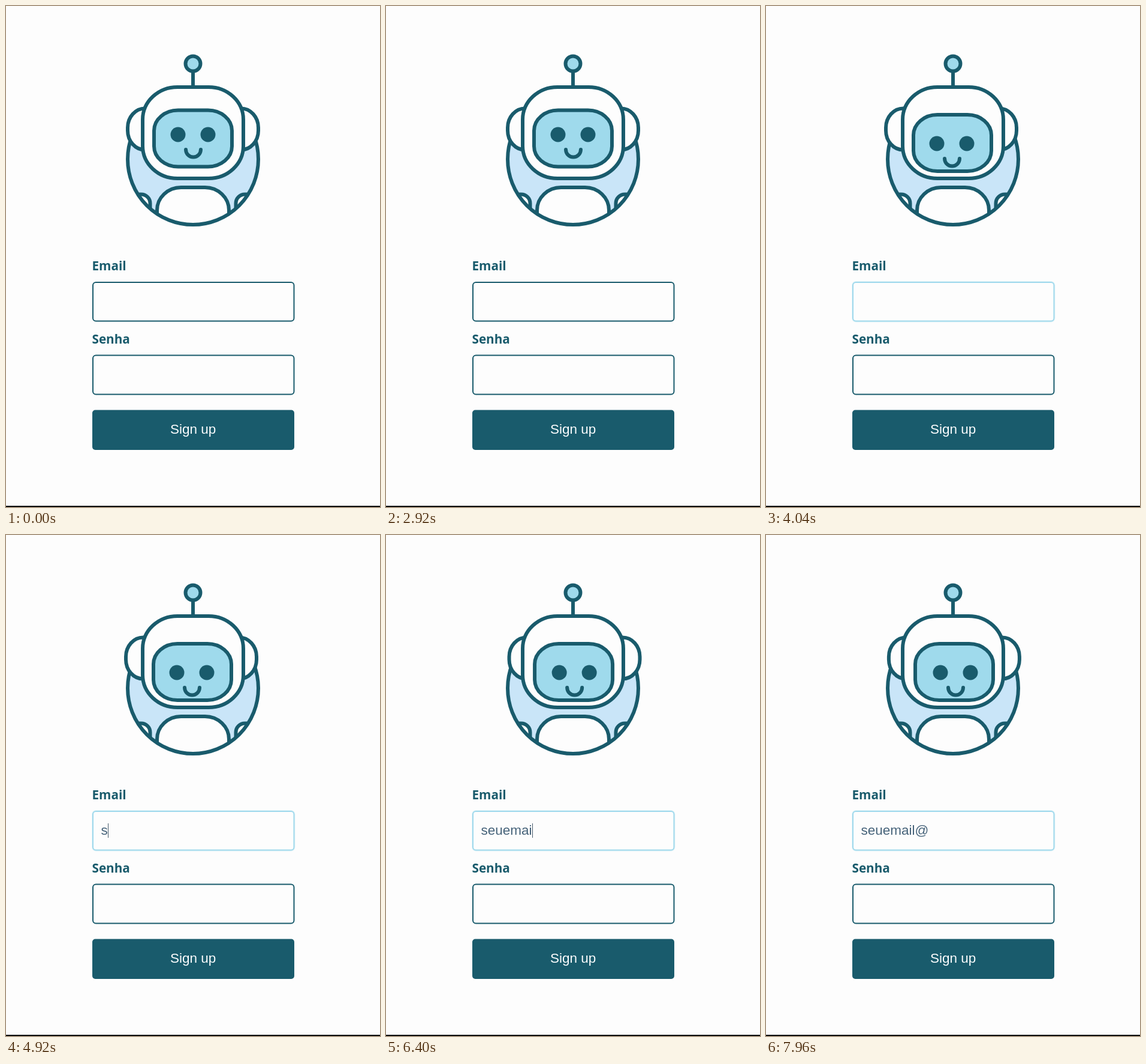
These frames come from a looping animation (624 by 834 pixels, 8 s). An HTML page with a canvas:

```html
<!DOCTYPE html>
<html lang="pt">
<head>
<meta charset="utf-8">
<title>Sign up</title>
<style>
  html, body { margin: 0; width: 100%; height: 100%; overflow: hidden; background: #fdfdfd; }
  canvas { display: block; width: 624px; height: 834px; }
</style>
</head>
<body>
<canvas id="stage" width="624" height="834"></canvas>
<script>
const ctx = document.getElementById('stage').getContext('2d');
const LOOP = 8000;
const PAPER = '#fdfdfd', DARK = '#195b6c', SKY = '#9fdaec', SUIT = '#c9e5f8';
const ARIAL = '22.5px "Liberation Sans", Arial, sans-serif';

const FOCUS = 3320;
const TEXT = 'seuemail@';
const KEYS = [4720, 5120, 5440, 5760, 5920, 6100, 6320, 6560, 7400];
const BLINKS = [20, 1785];
const BLINK_MS = 160;
// Horizontal gaze for each number of typed characters
const GAZE = [-2, -2, -0.5, 1, 1.4, 1.8, 2.1, 2.5, 3.2, 4];

const clamp = p => Math.max(0, Math.min(1, p));
const ease = p => { p = clamp(p); return p * p * (3 - 2 * p); };
const earShift = gaze => gaze < 0 ? -3 : 3.3 - 0.35 * gaze;

// Adds up eased steps, one for focus and one for each key
function follow(t, goal, ms, focusMs) {
  let last = goal(GAZE[0]);
  let value = last * ease((t - FOCUS) / focusMs);
  KEYS.forEach((at, i) => {
    const next = goal(GAZE[i + 1]);
    value += (next - last) * ease((t - at) / ms);
    last = next;
  });
  return value;
}

function eyeOpen(t) {
  for (const at of BLINKS) {
    const p = (t - at) / BLINK_MS;
    if (p > 0 && p < 1) return 1 - 0.9 * (1 - Math.abs(2 * p - 1));
  }
  return 1;
}

function paint(fill, stroke, width = 6) {
  if (fill) { ctx.fillStyle = fill; ctx.fill(); }
  if (stroke) { ctx.strokeStyle = stroke; ctx.lineWidth = width; ctx.stroke(); }
}

function box(x, y, w, h, r, fill, stroke, width) {
  ctx.beginPath();
  ctx.roundRect(x, y, w, h, r);
  paint(fill, stroke, width);
}

function disc(x, y, r, fill, stroke) {
  ctx.beginPath();
  ctx.arc(x, y, r, 0, 7);
  paint(fill, stroke);
}

function label(text, x, y, font, color, align = 'left') {
  ctx.font = font;
  ctx.fillStyle = color;
  ctx.textAlign = align;
  ctx.fillText(text, x, y);
}

function body() {
  disc(312, 255, 109, SUIT);
  ctx.save();
  ctx.beginPath();
  ctx.arc(312, 255, 109, 0, 7);
  ctx.clip();
  box(252, 302, 120, 100, { x: 40, y: 38 }, PAPER, DARK);
  box(200, 313.5, 40.5, 80, 15, PAPER, DARK);
  box(383.5, 313.5, 40.5, 80, 15, PAPER, DARK);
  ctx.restore();
  disc(312, 255, 109, null, DARK);
}

function head(t) {
  const ear = follow(t, earShift, 200, 220);
  const lookX = follow(t, g => g, 300, 400);
  const lookY = 15 * ease((t - FOCUS) / 500);

  box(203 + ear, 170.5, 60, 69, { x: 29, y: 32 }, PAPER, DARK);
  box(361 + ear, 170.5, 60, 69, { x: 29, y: 32 }, PAPER, DARK);
  ctx.beginPath();
  ctx.moveTo(312, 108);
  ctx.lineTo(312, 134);
  paint(null, DARK);
  disc(312, 96, 12.5, SKY, DARK);
  box(228, 135, 168, 152, { x: 58, y: 54 }, PAPER, DARK);
  box(247 + lookX / 2, 173.5 + lookY / 2, 130, 94, { x: 40, y: 34 }, SKY, DARK);

  const h = 25 * eyeOpen(t);
  for (const x of [287, 337]) {
    box(x - 12.5 + lookX, 214 - h / 2 + lookY, 25, h, h / 2, DARK);
  }
  ctx.beginPath();
  ctx.arc(312.5 + lookX, 239 + lookY, 12.5, 0, Math.PI);
  ctx.lineCap = 'round';
  paint(null, DARK);
  ctx.lineCap = 'butt';
}

function form(t) {
  const bold = '700 20.7px "Open Sans", "Noto Sans", sans-serif';
  const focused = t >= FOCUS;
  label('Email', 143.5, 440, bold, DARK);
  label('Senha', 143.5, 561.5, bold, DARK);
  if (focused) box(145, 460, 335.5, 64.5, 5, null, 'rgba(159,218,236,.3)', 4);
  box(145, 460, 335.5, 64.5, 5, PAPER, focused ? '#a0d9ec' : DARK, 2);
  box(145, 581.5, 335.5, 65, 5, PAPER, DARK, 2);
  box(144, 672.5, 337, 66.5, 5, DARK);
  label('Sign up', 312.2, 711.5, ARIAL, '#fafcfd', 'center');
  if (!focused) return;

  const count = KEYS.filter(at => t >= at).length;
  const typed = TEXT.slice(0, count);
  label(typed, 158.5, 499, ARIAL, '#46637a');
  const since = t - (count ? KEYS[count - 1] : FOCUS);
  if (since % 1000 < 500) {
    const x = Math.round(158.5 + ctx.measureText(typed).width);
    ctx.fillStyle = '#46596a';
    ctx.fillRect(x, 480, 1, 24);
  }
}

function pointer(t) {
  const enter = ease((t - 1200) / 320);
  const go = ease((t - 2560) / 640);
  const x = -16 + 28 * enter + 260 * go;
  const y = 538 - 40 * go;
  if (x <= -16 || (x > 144 && y < 526)) return;
  ctx.save();
  ctx.translate(x + 0.5, y + 0.5);
  ctx.beginPath();
  [[0, 0], [0, 20], [5, 16], [8, 23], [11.5, 21.5], [8.5, 14.5], [14.5, 14.5]]
    .forEach(([px, py]) => ctx.lineTo(px, py));
  ctx.closePath();
  paint(PAPER, '#666', 1);
  ctx.restore();
}

function frame() {
  const t = performance.now() % LOOP;
  ctx.fillStyle = PAPER;
  ctx.fillRect(0, 0, 624, 834);
  body();
  head(t);
  form(t);
  pointer(t);
  ctx.fillStyle = '#000';
  ctx.fillRect(0, 832, 624, 2);
  requestAnimationFrame(frame);
}
frame();
</script>
</body>
</html>
```
